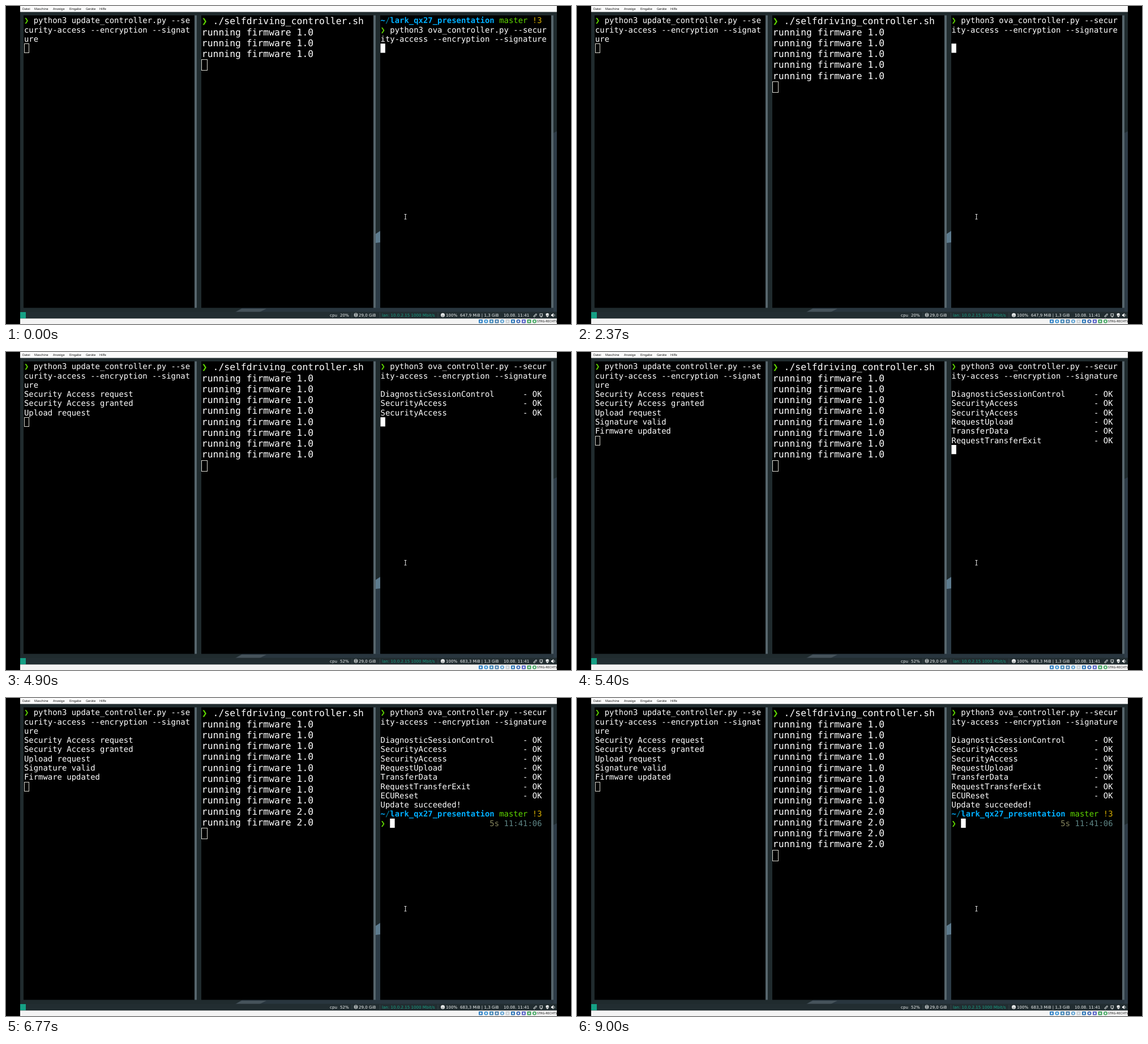
Animation of 998 by 561 pixels, one loop 9030 ms. Source, as an HTML page:

```html
<!DOCTYPE html>
<html lang="de">
<head>
<meta charset="utf-8">
<title>Firmware update in three terminals</title>
<style>
  html, body { margin: 0; width: 100%; height: 100%; overflow: hidden; background: #000; }
  svg { display: block; width: 100%; height: 100%; }
  text { white-space: pre; text-rendering: geometricPrecision; }
  .term { font-family: "DejaVu Sans Mono", monospace; fill: #fff; }
  .menu { font: 5.5px "Noto Sans", sans-serif; fill: #111; }
  .bar { font: 7.1px "DejaVu Sans", sans-serif; fill: #eef2f2; }
</style>
</head>
<body>
<svg viewBox="0 0 998 561" preserveAspectRatio="none">
  <!-- wallpaper -->
  <rect x="25" y="10" width="948" height="530" fill="#202b2e"/>
  <path d="M405 540L418 532H973V540Z" fill="#29363f"/>
  <path d="M405 540L416 534H460L448 540Z" fill="#46535b"/>
  <path d="M653 402L661 396V533H653Z" fill="#2c3b46"/>
  <path d="M653 402L661 397V417L653 418Z" fill="#5d7b8e"/>
  <path d="M967 224L973 221V540H967Z" fill="#2e3c47"/>

  <!-- menu, panel and status strip -->
  <rect x="25" width="948" height="10.5" fill="#fbfbfb"/>
  <rect x="25" y="539.5" width="948" height="12" fill="#222d31"/>
  <rect x="25" y="551.3" width="948" height="9.7" fill="#f4f4f4"/>
  <rect x="25" y="540" width="10" height="11" fill="#16a085"/>
  <g id="labels"></g>
  <path d="M611 541V550M660.500 541V550M763 541V550" stroke="#3c494e" stroke-width=".8"/>

  <!-- panel icons -->
  <g fill="none" stroke="#e6eaea" stroke-width=".9">
    <ellipse cx="618" cy="543.3" rx="2.7" ry="1.2"/>
    <path d="M615.300 543.300V547.200Q618 549.200 620.700 547.200V543.300M615.300 545.300Q618 547.300 620.700 545.300"/>
    <path d="M932 547.500L936 543Q938 543 937 545L934 548.300Q932 549 932 547.500L935 544.500"/>
    <rect x="943" y="543" width="4.600" height="4"/>
    <path d="M944 548.500H947"/>
    <path d="M968.200 543.500Q970.500 545.500 968.200 547.500"/>
  </g>
  <g fill="#f2f4f4">
    <circle cx="771.500" cy="545.300" r="3.500"/>
    <path d="M953.500 543L956.300 541.800L959 543Q959 547.500 956.300 549Q953.500 547.500 953.500 543Z"/>
    <path d="M963 544H964.500L967 541.800V549L964.500 547H963Z"/>
  </g>
  <path d="M769.600 546Q771.500 548.500 773.400 546M770 544H770.600M772.400 544H773" fill="none" stroke="#222d31" stroke-width=".8"/>
  <path d="M954.800 545.500L956 546.700L958 544.300" fill="none" stroke="#222d31" stroke-width=".8"/>
  <g id="devices"></g>

  <g id="windows"></g>
  <g id="live"></g>
  <path d="M703.500 367.500H707.500M705.500 367.500V376M703.500 376H707.500" fill="none" stroke="#ddd" stroke-width="1"/>
</svg>

<script>
const LOOP = 9030;
const GREEN = '#5fd700', BLUE = '#00afff';
const byId = id => document.getElementById(id);
const rect = (x, y, w, h, attrs) => `<rect x="${x}" y="${y}" width="${w}" height="${h}" ${attrs}/>`;
const label = (cls, x, y, str, fill = '') =>
  `<text class="${cls}" x="${x}" y="${y}"${fill && ` style="fill:${fill}"`}>${str}</text>`;

const panes = {
  left:   { x: 32,    top: 17.5, size: 13.92, pitch: 16.27 },
  middle: { x: 345.8, top: 17.3, size: 16.4,  pitch: 19.25 },
  right:  { x: 661.5, top: 17.5, size: 13.93, pitch: 16.27 }
};

// A row is a list of spans: [column, text, colour, bold]
const plain = str => [[0, str]];
const prompt = str => [[0, '❯', GREEN], [2, str]];
const result = step => [[0, step], [30, '- OK']];
const path = [
  [0, '~', BLUE, true], [1, '/', '#0087af'], [2, 'lark_qx27_presentation', BLUE, true],
  [25, 'master', GREEN], [32, '!3', '#d7af00']
];

const ENTER = 1330, STATUS = 4200, DONE = 6130;
const leftLog = [
  [4200, 'Security Access request'], [4330, 'Security Access granted'], [4400, 'Upload request'],
  [5200, 'Signature valid'], [5330, 'Firmware updated']
];
const rightLog = [
  [4130, 'DiagnosticSessionControl'], [4270, 'SecurityAccess'], [4370, 'SecurityAccess'],
  [5070, 'RequestUpload'], [5170, 'TransferData'], [5300, 'RequestTransferExit'], [5600, 'ECUReset']
];
const SUCCESS = 5670;
const ticks = [0, 0, 0, 630, 1700, 2730, 3770, 4770, 5800, 6770, 7800, 8800];
const OLD_TICKS = 8;

const changes = [ENTER, STATUS, DONE, SUCCESS, ...ticks,
  ...leftLog.map(e => e[0]), ...rightLog.map(e => e[0])];

const past = (log, t) => log.filter(e => e[0] <= t).map(e => e[1]);

function leftRows(t) {
  return [prompt('python3 update_controller.py --se'),
    plain('curity-access --encryption --signat'), plain('ure'),
    ...past(leftLog, t).map(plain)];
}

function middleRows(t) {
  const lines = ticks.filter(tick => tick <= t)
    .map((_, i) => plain(`running firmware ${i < OLD_TICKS ? 1 : 2}.0`));
  return [prompt('./selfdriving_controller.sh'), ...lines];
}

function rightRows(t) {
  const command = [prompt('python3 ova_controller.py --secur'),
    plain('ity-access --encryption --signature')];
  if (t < ENTER) return [path, ...command];
  const rows = [...command, [], ...past(rightLog, t).map(result)];
  if (t >= SUCCESS) rows.push(plain('Update succeeded!'));
  if (t >= DONE) rows.push(path, [...prompt(''), [23, '5s', '#87875f'], [26, '11:41:06', '#5f8787']]);
  return rows;
}

function drawRows({ x, top, size, pitch }, rows) {
  return rows.map((row, i) => row.map(([col, str, fill = '#fff', bold]) =>
    `<text class="term" x="${x + col * size * 0.602}" y="${top + i * pitch + size * 0.925}"
      style="font-size:${size}px;fill:${fill};font-weight:${bold ? 700 : 400}">${str}</text>`
  ).join('')).join('');
}

function drawCursor({ x, top, size, pitch }, row, col, solid) {
  const w = size * 0.602, left = x + col * w, y = top + row * pitch;
  return solid
    ? rect(left, y, w, pitch, 'fill="#fff"')
    : rect(Math.floor(left) + .5, Math.round(y) + .5, Math.round(w), Math.round(pitch),
        'fill="none" stroke="#d8d8d0"');
}

function drawScene(t) {
  const left = leftRows(t), middle = middleRows(t), right = rightRows(t);
  const done = t >= DONE, busy = t >= STATUS;
  return drawRows(panes.left, left) + drawCursor(panes.left, left.length, 0)
    + drawRows(panes.middle, middle) + drawCursor(panes.middle, middle.length, 0)
    + drawRows(panes.right, right)
    + drawCursor(panes.right, right.length - (done ? 1 : 0), done ? 2 : 0, true)
    + label('bar', 590, 548, busy ? '52%' : '20%')
    + label('bar', 802, 548, `${busy ? '683,3' : '647,9'} MiB | 1,3 GiB`);
}

byId('windows').innerHTML = [31, 345, 661].map((x, i) => {
  const w = i ? 304 - 2 * (i - 1) : 302;
  return rect(x, 16.5, w, 516, 'fill="#000"') + rect(x + w, 16.5, 4, 516, 'fill="#56656c"');
}).join('');

byId('labels').innerHTML =
  [[29, 'Datei'], [50, 'Maschine'], [83, 'Anzeige'], [112, 'Eingabe'], [141, 'Geräte'], [165, 'Hilfe']]
    .map(([x, str]) => label('menu', x, 7.4, str)).join('')
  + label('bar', 572, 548, 'cpu')
  + label('bar', 623, 548, '29,0 GiB')
  + label('bar', 664, 548, 'lan: 10.0.2.15 1000 Mbit/s', '#16a085')
  + label('bar', 777, 548, '100%')
  + label('bar', 879, 548, '10.08. 11:41')
  + label('menu', 938, 558.3, 'STRG-RECHTS');

byId('devices').innerHTML =
  ['#2f7fc4', '#3a92d4', '#3f86b8', '#4a7fae', '#5b9fd0', '#c9ced2', '#2f78b8', '#3565b5', '#5a62c8', '#3fa35a', '#45a860']
    .map((fill, i) => {
      const x = 835 + i * 9.5;
      return rect(x, 553, 7, 6.6, `rx="${i % 3 === 1 ? 3.3 : 1}" fill="${fill}"`)
        + rect(x + 2, 554.8, 3, 3, 'rx="1" fill="#e4f0f8"');
    }).join('');

let shown = -1;
function frame() {
  const t = performance.now() % LOOP;
  const step = changes.filter(c => c <= t).length;
  if (step !== shown) {
    shown = step;
    byId('live').innerHTML = drawScene(t);
  }
  requestAnimationFrame(frame);
}
frame();
</script>
</body>
</html>
```
